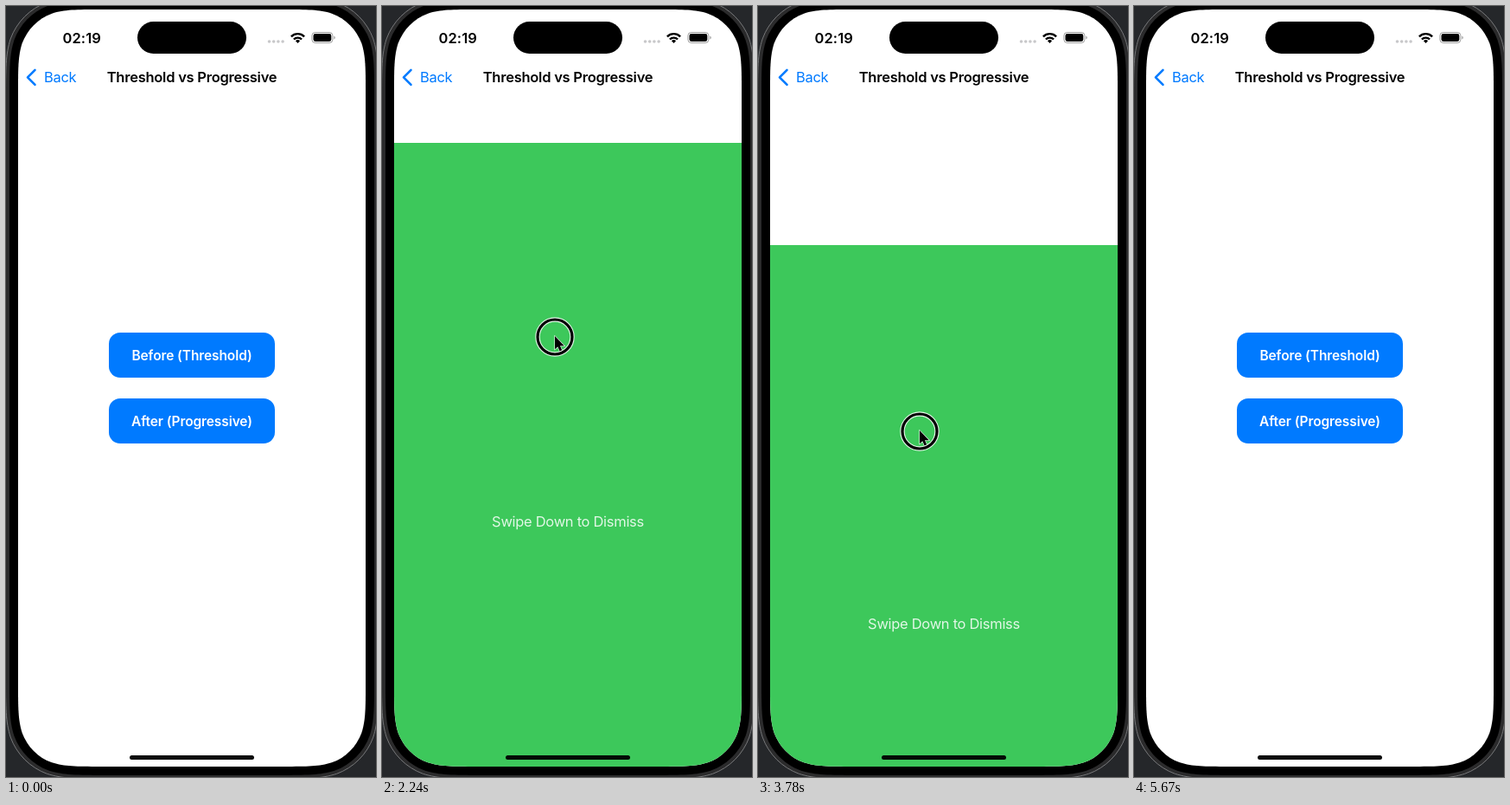
Animation, 428 px wide and 890 px high, one loop 6.23 s. Source, as an HTML page:

```html
<!DOCTYPE html>
<html lang="en">
<head>
<meta charset="utf-8">
<title>Threshold vs Progressive</title>
<style>
html, body { margin: 0; width: 100%; height: 100%; overflow: hidden; background: #25272a; }
svg { display: block; width: 428px; height: 890px; font-family: Inter, Roboto, sans-serif; font-size: 16.5px; }
.bold { font-weight: 600; letter-spacing: -.25px; }
.button { font-size: 15.5px; font-weight: 600; letter-spacing: -.1px; fill: #fff; }
.light { letter-spacing: -.3px; }
.mid { text-anchor: middle; }
</style>
</head>
<body>
<svg viewBox="0 0 428 890">
  <defs><clipPath id="clip"><path id="screen"/></clipPath></defs>
  <path id="frame" fill="#2b2b2c" stroke="#77787a"/>
  <path id="bezel"/>
  <g clip-path="url(#clip)">
    <rect width="428" height="890" fill="#fff"/>
    <path d="M33.5 73.8 25 82.3 33.5 90.8" fill="none" stroke="#007aff" stroke-width="2.6" stroke-linecap="round" stroke-linejoin="round"/>
    <text class="light" x="44" y="88.3" fill="#007aff">Back</text>
    <text class="bold mid" x="215" y="88.3">Threshold vs Progressive</text>
    <rect x="119" y="377" width="192" height="52" rx="13" fill="#007aff"/>
    <rect x="119" y="453" width="192" height="52" rx="13" fill="#007aff"/>
    <text class="button mid" x="215" y="408.6">Before (Threshold)</text>
    <text class="button mid" x="215" y="484.6">After (Progressive)</text>
    <g id="sheet">
      <rect width="428" height="890" fill="#3dc85b"/>
      <text class="light mid" x="215" y="443" fill="#fff" fill-opacity=".85">Swipe Down to Dismiss</text>
    </g>
    <text class="bold" x="65.5" y="42.8" style="letter-spacing:.1px">02:19</text>
    <rect x="152" y="18" width="126" height="37" rx="18.5"/>
    <g fill="#c8c8ca">
      <circle cx="304.5" cy="41" r="1.8"/><circle cx="309.7" cy="41" r="1.8"/>
      <circle cx="314.9" cy="41" r="1.8"/><circle cx="320.1" cy="41" r="1.8"/>
    </g>
    <g fill="none" stroke="#000" stroke-width="2.4">
      <path d="M329.9 35.3a10.8 10.8 0 0 1 15.2 0"/>
      <path d="M332.9 38.5a6.5 6.5 0 0 1 9.2 0"/>
    </g>
    <path d="M337.5 43 334.9 40.3a3.7 3.7 0 0 1 5.2 0Z"/>
    <rect x="353.9" y="30.5" width="24" height="12" rx="3.7" fill="none" stroke="#000" stroke-opacity=".38"/>
    <rect x="355.5" y="32.1" width="20.8" height="8.8" rx="2.3"/>
    <path d="M379.4 34.5a2.2 2.2 0 0 1 0 4Z" fill-opacity=".4"/>
    <rect x="143" y="865" width="144" height="5" rx="2.5" fill-opacity=".95"/>
  </g>
  <g id="pointer">
    <g id="ring" fill="none">
      <circle r="20" stroke="#fff" stroke-width="5.4" stroke-opacity=".85"/>
      <circle r="20" stroke="#000" stroke-width="3.2"/>
    </g>
    <path d="M0-1V14.3L3.3 11.3 5.6 16.4 8.2 15.2 6 10.2H10.8Z" stroke="#fff" stroke-width="1.1" paint-order="stroke"/>
  </g>
</svg>
<script>
const LOOP = 6230, STEP = 70, REST = 59, HIDDEN = 900;
const el = id => document.getElementById(id);

// Rectangle with continuous-curvature corners
function smoothRect(x, y, w, h, r) {
  const corner = [[1.529, 0], [1.088, 0], [.868, 0], [.631, .075], [.373, .169], [.169, .373],
    [.075, .631], [0, .868], [0, 1.088], [0, 1.529]];
  const place = (pts, fx, fy) => pts.map(([a, b]) =>
    [fx ? x + w - a * r : x + a * r, fy ? y + h - b * r : y + b * r]);
  const back = [...corner].reverse();
  const part = ([p, ...rest], i) => (i ? 'L' : 'M') + p + 'C' + rest.join(' ');
  return [place(back, 0, 0), place(corner, 1, 0), place(back, 1, 1), place(corner, 0, 1)]
    .map(part).join('') + 'Z';
}
el('screen').setAttribute('d', smoothRect(14, 4, 402, 874, 62));
el('bezel').setAttribute('d', smoothRect(4, -6, 422, 894, 72));
el('frame').setAttribute('d', smoothRect(-.5, -10, 431, 902, 76));

// Pointer path: time, x, y
const path = [
  [140, 225.5, 622], [210, 230, 505], [280, 231.5, 473], [1050, 231.5, 473],
  [1540, 200, 280], [1610, 200, 280], [2240, 200, 382], [2800, 200, 451], [2870, 200, 451],
  [3150, 200, 300], [3290, 200, 287], [3360, 200, 287], [3780, 187, 491], [4060, 187, 491],
  [4550, 195, 288], [4620, 195, 288], [4690, 195, 365], [4830, 193, 698], [5460, 193, 698],
  [5530, 196, 740], [5600, 205, 840], [5670, 212, 910]
];
// Sheet top while the finger moves it: time, y
const drag = [
  [1680, REST], [2240, 158], [2800, 236], [2870, 236], [3150, 87], [3290, 73], [3360, 73], [3780, 276]
];
const flick = [[4620, REST], [4690, 136], [4830, 469], [4970, 760], [5180, HIDDEN]];

// Monotone cubic through the keys, still at turning points
function track(keys, t, c = 1) {
  const last = keys.length - 1;
  if (t <= keys[0][0]) return keys[0][c];
  if (t >= keys[last][0]) return keys[last][c];
  const i = keys.findIndex(k => k[0] > t) - 1;
  const slope = j => j < 0 || j >= last ? 0 : (keys[j + 1][c] - keys[j][c]) / (keys[j + 1][0] - keys[j][0]);
  const tangent = j => {
    const a = slope(j - 1), b = slope(j);
    return a * b > 0 ? 2 * a * b / (a + b) : 0;
  };
  const span = keys[i + 1][0] - keys[i][0], u = (t - keys[i][0]) / span, v = 1 - u;
  return keys[i][c] * (1 + 2 * u) * v * v + keys[i + 1][c] * u * u * (3 - 2 * u)
    + span * u * v * (tangent(i) * v - tangent(i + 1) * u);
}

function spring(from, to, ms, rate) {
  const k = Math.max(0, ms) / 1000 * rate;
  return to + (from - to) * (1 + k) * Math.exp(-k);
}

function sheetTop(t) {
  if (t < 1680) return spring(HIDDEN, REST, t - 594, 18.26);
  if (t <= 3780) return track(drag, t);
  if (t < 4620) return spring(276, REST, t - 3780, 24);
  return track(flick, t);
}

const within = (t, a, b) => t >= a && t < b;
const show = (id, on) => el(id).setAttribute('visibility', on ? 'inherit' : 'hidden');
const move = (id, x, y) => el(id).setAttribute('transform', `translate(${x} ${y})`);

const start = performance.now();
function draw() {
  const t = Math.floor((performance.now() - start) % LOOP / STEP) * STEP;
  move('sheet', 0, sheetTop(t));
  move('pointer', track(path, t, 1), track(path, t, 2));
  show('pointer', within(t, 140, 5670));
  show('ring', within(t, 490, 630) || within(t, 1680, 3990) || within(t, 4620, 4830));
  requestAnimationFrame(draw);
}
draw();
</script>
</body>
</html>
```
